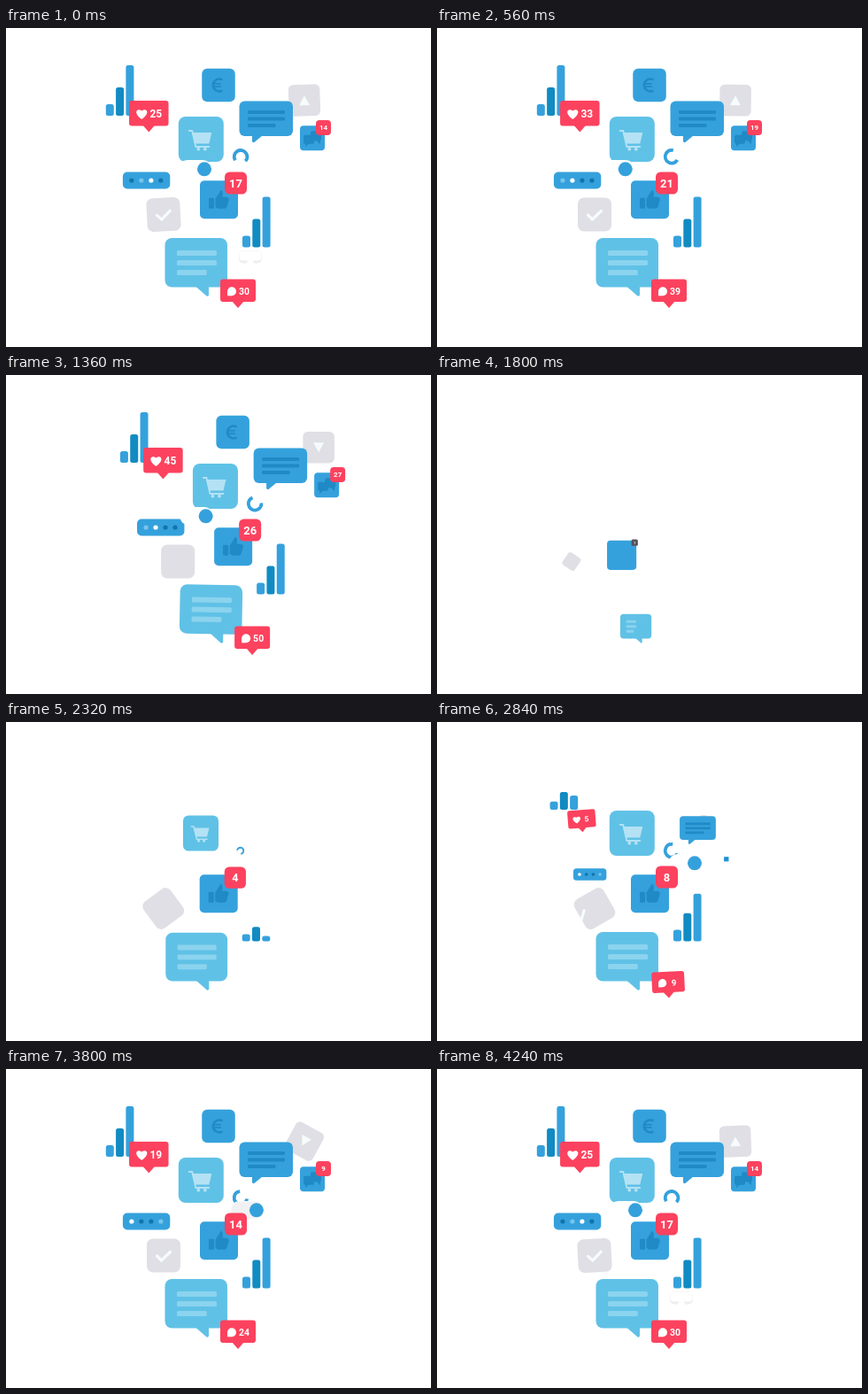
An HTML page with a canvas for the animation above (4.28 s loop, 480 by 360 pixels).

```html
<!DOCTYPE html>
<html lang="en">
<head>
<meta charset="utf-8">
<style>
html, body { margin: 0; width: 100%; height: 100%; overflow: hidden; background: #fff; }
canvas { display: block; }
</style>
</head>
<body>
<canvas id="stage" width="480" height="360"></canvas>
<script>
const LOOP = 4280, CUT = 1640, WRAP = 4240;
const BLUE = '#35a1dc', DARK = '#1f8ac5', DEEP = '#118bc2', SKY = '#60c1e6', PALE = '#8bd3ee';
const GREY = '#dfdfe5', RED = '#fc425e', ICE = '#f6fbfc', WHITE = '#fff';
const g = document.getElementById('stage').getContext('2d');
let now = CUT; // runs from the scene cut to the next one

// Progress rules, each 0 to 1
const part = (from, to) => Math.min(1, Math.max(0, (now - from) / (to - from)));
const rise = (start, span = 900) => 1 - (1 - part(start, start + span)) ** 3;
const glide = (from, to) => { const k = part(from, to); return k * k * (3 - 2 * k); };
const bump = (from, to) => Math.sin(Math.PI * part(from, to)) ** 2;
const lull = () => bump(3400, 5200);

// Whole steps of `pace` ms since `start`
const count = (start, pace) => String(Math.max(0, Math.floor((now - start) / pace)));

function put(x, y, scale, turn, draw) {
  if (scale <= 0) return;
  g.save();
  g.translate(x, y);
  g.rotate(turn * Math.PI / 180);
  g.scale(scale, scale);
  draw();
  g.restore();
}

// Grows at (x, y), coming from (x + dx, y + dy)
function pop(k, x, y, dx, dy, turn, draw) {
  put(x + dx * (1 - k), y + dy * (1 - k), k, turn, draw);
}

function box(x, y, w, h, r, color) {
  g.fillStyle = color;
  g.beginPath();
  g.roundRect(x, y, w, h, r);
  g.fill();
}

const tile = (size, r, color) => box(-size / 2, -size / 2, size, size, r, color);

function dot(x, y, r, color) {
  g.fillStyle = color;
  g.beginPath();
  g.arc(x, y, r, 0, 7);
  g.fill();
}

function shape(d, color) {
  g.fillStyle = color;
  g.fill(new Path2D(d));
}

function stroke(d, color, width) {
  g.strokeStyle = color;
  g.lineWidth = width;
  g.lineCap = g.lineJoin = 'round';
  g.stroke(new Path2D(d));
}

function label(text, x, y, size) {
  g.fillStyle = WHITE;
  g.font = `600 ${size}px Roboto, sans-serif`;
  g.textAlign = 'center';
  g.fillText(text, x, y + size * 0.36);
}

function lines(x, y, w, h, gap, color) {
  for (let i = 0; i < 3; i++) box(x, y + i * gap, i < 2 ? w : w * .75, h, h / 4, color);
}

function chart(x, base, start) {
  [13, 32, 57].forEach((full, i) => {
    const h = full * rise(start + 52 * i * i);
    if (h > 0) box(x + i * 11.3, base - h, 9, h, Math.min(2.5, h / 2), i === 1 ? DEEP : BLUE);
  });
}

const leftChart = () => chart(112.8 + 50 * (1 - rise(2540)), 99, 2540);
const rightChart = () => chart(267, 247.5, 2080);

function euro() {
  pop(rise(2887), 240, 64.5, -19, 62, 0, () => {
    tile(37.5, 6, BLUE);
    stroke('M3.5-6.5A7 7 0 1 0 3.5 6.5', DARK, 2.6);
    stroke('M-5.5-1.7H2M-5.5 1.7H2', DARK, 1.8);
  });
}

function pointer() {
  const turn = 90 * (1 + glide(2800, 3340)) + 180 * (glide(3640, 4280) + glide(4780, 5360));
  pop(rise(2775), 337, 81.7, -45, 34, turn, () => {
    tile(35.5, 5.5, GREY);
    shape('M0-5.5L6 5.5H-6Z', ICE);
  });
}

function darkBubble() {
  pop(rise(2560), 281, 129, 15, 27, 0, () => {
    box(-17.5, -46.6, 60.5, 39.6, 6, BLUE);
    shape('M-3-8V-1Q-2 1 0-.5L9-8Z', BLUE);
    lines(-8, -36, 42, 4, 7.5, DARK);
  });
}

function chat() {
  pop(rise(2777), 346, 124.2, -24, 38, 0, () => {
    tile(28, 4, BLUE);
    box(-2, -8, 12, 11, 2, DARK);
    shape('M4 2H9V7Z', DARK);
    box(-10, -3.5, 12, 10, 2, DARK);
    shape('M-8 5H-3L-8 10Z', DARK);
  });
  pop(rise(2977), 358.5, 112.5, -10, 10, 0, () => {
    tile(17, 4, RED);
    label(count(2835, 100), 0, 0, 8);
  });
}

function flag(w, h, r) {
  box(-w / 2, -7 - h, w, h, r, RED);
  shape('M-7-8H7L0 0Z', RED);
}

function heart() {
  const k = rise(2540);
  pop(k, 161.3, 117.5, 11, 23, -15 * (1 - k), () => {
    flag(44.5, 28.5, 3);
    shape('M-8-14.5C-18-21-14-28-8-24C-2-28 2-21-8-14.5Z', WHITE);
    label(count(2490, 68), 8, -20.8, 12);
  });
}

function comment() {
  const k = rise(2327);
  pop(k, 262, 316, 0, -56, -37 * (1 - k), () => {
    flag(40, 25.5, 3);
    dot(-7, -18.8, 5, WHITE);
    shape('M-12-19V-13.8H-7Z', WHITE);
    label(count(2187, 67), 7, -18.7, 10.5);
  });
}

function cart() {
  put(220.3, 125.5, rise(2160, 400), 0, () => {
    const ink = '#b4e2f4';
    tile(51, 8, SKY);
    stroke('M-13.5-9.5H-10L-6 8.5H9', ink, 1.8);
    shape('M-10.5-7.5H12L9 5H-7Z', ink);
    dot(-3, 11.2, 1.9, ink);
    dot(4.5, 11.2, 1.9, ink);
  });
}

function spinner() {
  put(265, 145.3, rise(2240, 400), .38 * (now - 2840) - 30 - 50 * lull(), () => {
    g.strokeStyle = BLUE;
    g.lineWidth = 3.8;
    g.lineCap = 'butt';
    g.beginPath();
    g.arc(0, 0, 7.3, .95, 5.4);
    g.stroke();
  });
}

function pager() {
  const lit = Math.floor((now - 2840) / 208 + .33 - .2 * lull());
  pop(rise(2543), 158.6, 172, 47, 0, 0, () => {
    box(-26.7, -9.5, 53.4, 19, 5, BLUE);
    for (let i = 0; i < 4; i++) {
      const age = (lit - i + 12) % 4;
      dot(-16.7 + i * 11, 0, 2.6, age === 0 ? WHITE : age === 1 ? '#78c4ec' : '#1274a9');
    }
  });
}

function toggle() {
  const size = rise(2480, 400);
  const mid = 280.5 + 22 * glide(2840, 3400) - 89 * glide(3520, WRAP) - 14.5 * glide(WRAP, 5200);
  const side = 1 - 2 * glide(4700, 5200) + 2 * glide(5300, 5600);
  put(mid, 159.3, size, 0, () => {
    box(-19, -10.3, 38, 20.6, 10.3, WHITE);
    g.globalAlpha = glide(2860, 3200) - glide(3520, 4000);
    box(-18.7, -10, 37.4, 20, 10, '#e0e0e6');
    box(-17.2, -8.5, 34.4, 17, 8.5, '#ebebef');
    g.globalAlpha = glide(4700, 5200) - glide(5300, 5480);
    const shade = g.createLinearGradient(0, -4, 17, 10);
    shade.addColorStop(.3, '#ffffff');
    shade.addColorStop(1, '#d3d3dc');
    box(-18.7, -10, 37.4, 20, 10, shade);
  });
  put(mid + 10.5 * side, 159.3, size, 0, () => dot(0, 0, 8, BLUE));
}

function thumb() {
  pop(rise(1452), 240.5, 193.7, -18, 42, 0, () => {
    tile(43, 5, BLUE);
    g.globalAlpha = glide(1800, 2120);
    box(-11.5, -2, 6, 12, 1, DARK);
    shape('M-4-1L1-9Q2-12 4-9.5Q5-7 4-3H9Q12-2 11 1L9 8Q8 10 6 10H-1L-4 8Z', DARK);
  });
  const k = rise(1704);
  pop(k, 259.5, 175, -12, 20, 0, () => {
    tile(25, 5.5, k < .35 ? '#55525a' : RED);
    label(count(1590, 150), 0, 0, 13);
  });
}

function tick() {
  const k = rise(1642);
  const turn = -36 * (2 - k - glide(2700, 3240)) - 3 * bump(3900, 4600);
  pop(k, 178, 210.5, 3, 0, turn, () => {
    tile(38, 7, GREY);
    g.beginPath();
    g.roundRect(-19, -19, 38, 38, 7);
    g.clip();
    g.translate(36 * (glide(2560, 3140) - 1 + glide(5300, 5540)), 0);
    stroke('M-7.5 .5L-2.5 5.5L7.5-4', ICE, 3.2);
  });
}

function lightBubble() {
  const k = rise(1615), dip = bump(3000, 3800);
  put(228 + 62 * (1 - k), 302.5, k * (1 - .14 * dip), glide(4800, 5280) - 8.5 * dip, () => {
    box(-48.5, -65.5, 70.5, 55.5, 8, SKY);
    shape('M-14-11H1V-1Q0 1-2-.5Z', SKY);
    lines(-35, -51.5, 45 * k, 6, 11, PALE);
  });
}

function cloud() {
  g.globalAlpha = bump(3920, 4600);
  box(263, 251.5, 26, 14, 5, '#eeeeef');
  box(263.5, 252, 25, 10.5, 4, WHITE);
  dot(276, 266, 4, WHITE);
  g.globalAlpha = 1;
}

// The scene swings out to the right and the next one settles in from the left.
function pan() {
  return now < WRAP ? -28 * 2 ** ((1800 - now) / 80) : 16 * 2 ** ((now - 5600) / 80);
}

const layers = [leftChart, heart, euro, pointer, darkBubble, chat, cart, spinner, pager,
  toggle, thumb, tick, rightChart, cloud, lightBubble, comment];

function paint(t) {
  now = t < CUT ? t + WRAP : Math.min(t, WRAP);
  g.fillStyle = WHITE;
  g.fillRect(0, 0, 480, 360);
  g.save();
  g.translate(pan(), 0);
  layers.forEach(draw => draw());
  g.restore();
}

const start = performance.now();
function frame() {
  paint((performance.now() - start) % LOOP);
  requestAnimationFrame(frame);
}
frame();
</script>
</body>
</html>
```
